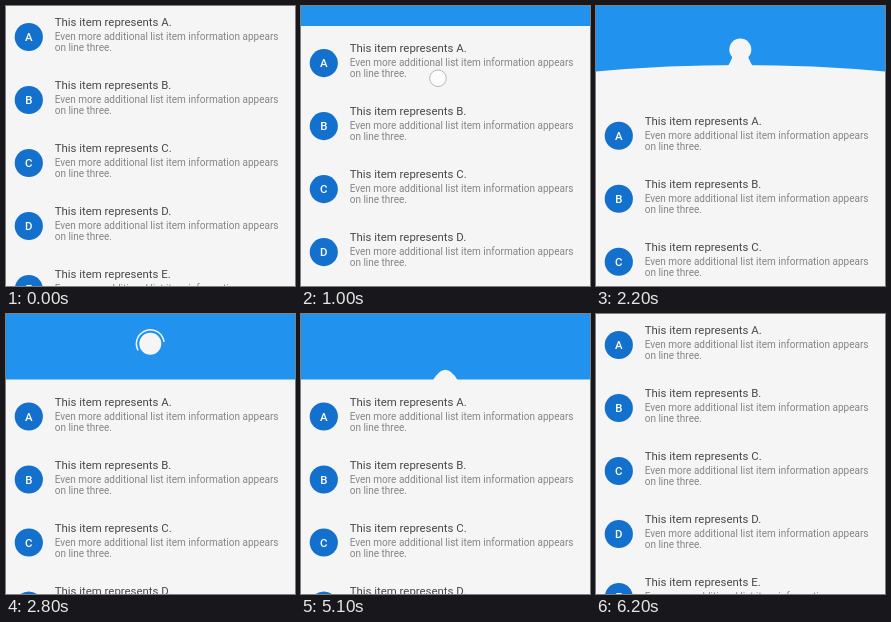
Animation, 289 px wide and 280 px high, one loop 6300 ms. Source, as an HTML page with a canvas:

```html
<!DOCTYPE html>
<html lang="en">
<head>
<meta charset="utf-8">
<title>Pull to refresh</title>
<style>
html, body { margin: 0; width: 100%; height: 100%; overflow: hidden; background: #f5f5f5; }
canvas { display: block; width: 289px; height: 280px; }
</style>
</head>
<body>
<canvas id="stage"></canvas>
<script>
const W = 289, H = 280, LOOP = 6300;
const HEAD = 71.5, CROP = 6;          // header height, part hidden above the stage
const EDGE = HEAD - CROP, MID = EDGE / 2 - 3;
const CX = 144.3, R = 11, RING = 13.9;
const BLUE = '#2292ef', DISC = '#1470cd', PAPER = '#f5f5f5';
const RELEASE = 2000, FINISH = 4524, CLOSE = 5324;

const cv = document.getElementById('stage');
const c = cv.getContext('2d');
const dpr = window.devicePixelRatio || 1;
cv.width = W * dpr;
cv.height = H * dpr;

const clamp = x => Math.max(0, Math.min(1, x));
const span = (t, a, b) => clamp((t - a) / (b - a));
const lerp = (a, b, p) => a + (b - a) * p;

function pull(t) {
  const x = Math.max(0, t - 1500);
  return Math.max(0, 0.104 * (t - 750)) - 5.6e-5 * x * x;
}

function offsetAt(t) {
  if (t < RELEASE) return pull(t);
  if (t < CLOSE) {
    const p = span(t, RELEASE, RELEASE + 470);
    return lerp(pull(RELEASE), HEAD, (1 - Math.cos(Math.PI * p)) / 2);
  }
  const left = 1 - span(t, CLOSE, CLOSE + 300);
  return HEAD * left * left;
}

// how far the middle of the header edge bulges down
function waveAt(t) {
  if (t < RELEASE) return Math.max(0, pull(t) - HEAD) * 0.95;
  const keys = [(pull(RELEASE) - HEAD) * 0.95, 0, -8, 0, -3, 0];
  const q = 1 - span(t, RELEASE, RELEASE + 800);
  const f = (1 - q * q) * 5, i = Math.min(4, Math.floor(f));
  return lerp(keys[i], keys[i + 1], f - i);
}

function disc(x, y, r, color) {
  c.fillStyle = color;
  c.beginPath();
  c.arc(x, y, r, 0, 2 * Math.PI);
  c.fill();
}

function text(str, x, y, size, color, weight = 400) {
  c.font = weight + ' ' + size + 'px Roboto, sans-serif';
  c.fillStyle = color;
  c.fillText(str, x, y);
}

function list(off) {
  for (let i = 0; i < 5; i++) {
    const y = off + i * 63, name = 'ABCDE'[i];
    disc(22.8, y + 31, 14.1, DISC);
    c.textAlign = 'center';
    text(name, 22.8, y + 35, 11.4, '#fff', 500);
    c.textAlign = 'left';
    text('This item represents ' + name + '.', 48.7, y + 20, 11.4, '#484848');
    text('Even more additional list item information appears', 48.7, y + 34, 10, '#858585');
    text('on line three.', 48.7, y + 45.3, 10, '#858585');
  }
}

function header(off, wave) {
  const edge = Math.min(off, HEAD) - CROP;
  if (edge <= 0) return;
  c.fillStyle = BLUE;
  c.beginPath();
  c.moveTo(0, 0);
  c.lineTo(0, edge);
  c.quadraticCurveTo(W / 2, edge + 2 * wave, W, edge);
  c.lineTo(W, 0);
  c.fill();
}

// neck joining the ball to the paper; p: 0 thick, 1 gone
function tail(y, base, p) {
  const foot = 14 - 3 * p, neck = 10 * (1 - p * p * 0.85);
  c.fillStyle = PAPER;
  c.beginPath();
  c.moveTo(CX - foot, base + 1);
  c.quadraticCurveTo(CX - neck, lerp(base, y, 0.5), CX - neck, y + 4);
  c.lineTo(CX + neck, y + 4);
  c.quadraticCurveTo(CX + neck, lerp(base, y, 0.5), CX + foot, base + 1);
  c.fill();
}

function ring(start, sweep, r, alpha) {
  c.globalAlpha = alpha;
  c.strokeStyle = PAPER;
  c.lineWidth = 1.5;
  c.beginPath();
  c.arc(CX, MID, r, start * Math.PI / 180, (start + sweep) * Math.PI / 180);
  c.stroke();
  c.globalAlpha = 1;
}

// the head runs ahead while the arc grows, then the end catches up
function spinner(t) {
  const n = (t - 4200) * 0.06, cycle = Math.floor(n / 74), k = n - cycle * 74;
  const shrink = Math.min(k, 37), grow = Math.max(0, k - 37);
  const start = -58 + cycle * 481 + shrink * 10 + grow * 3;
  ring(start, 271 - 7 * shrink + 7 * grow, RING, 1);
}

function ball(t, wave) {
  if (t > 2080 && t < FINISH) {
    const p = span(t, 2100, 2275), y = lerp(EDGE - 3, MID, p);
    if (p < 1) tail(y, EDGE + wave, p);
    disc(CX, y, R, PAPER);
    if (t > 2300) spinner(t);
  } else if (t >= FINISH && t < CLOSE) {
    const p = (t - FINISH) / 800;
    if (p < 0.3) {
      const q = 1 - p / 0.3;
      disc(CX, MID, R, PAPER);
      ring(0, 360, R + (RING - R) * q, q);
    } else if (p < 0.7) {
      const y = lerp(MID, EDGE, (p - 0.3) / 0.4);
      if (y > EDGE - 2 * R) tail(y, EDGE, (EDGE - y) / (2 * R));
      disc(CX, y, R, PAPER);
    } else {
      const q = (p - 0.7) / 0.3, half = R * (1 + 2 * q);
      c.fillStyle = PAPER;
      c.beginPath();
      c.moveTo(CX - half, EDGE + 1);
      c.quadraticCurveTo(CX, EDGE - 2 * R * (1 - q), CX + half, EDGE + 1);
      c.fill();
    }
  }
}

function pointer(t) {
  if (t < 600 || t >= RELEASE) return;
  const y = Math.max(10, 72 + 0.252 * (t - 1000));
  disc(137, y, 8.3, 'rgba(255,255,255,0.65)');
  c.strokeStyle = '#b9b9b9';
  c.lineWidth = 1;
  c.stroke();
}

function draw(t) {
  const off = offsetAt(t), wave = waveAt(t);
  c.setTransform(dpr, 0, 0, dpr, 0, 0);
  c.fillStyle = PAPER;
  c.fillRect(0, 0, W, H);
  header(off, wave);
  ball(t, wave);
  list(off);
  pointer(t);
}

const begin = performance.now();
function tick() {
  draw((performance.now() - begin) % LOOP);
  requestAnimationFrame(tick);
}
tick();
</script>
</body>
</html>
```
